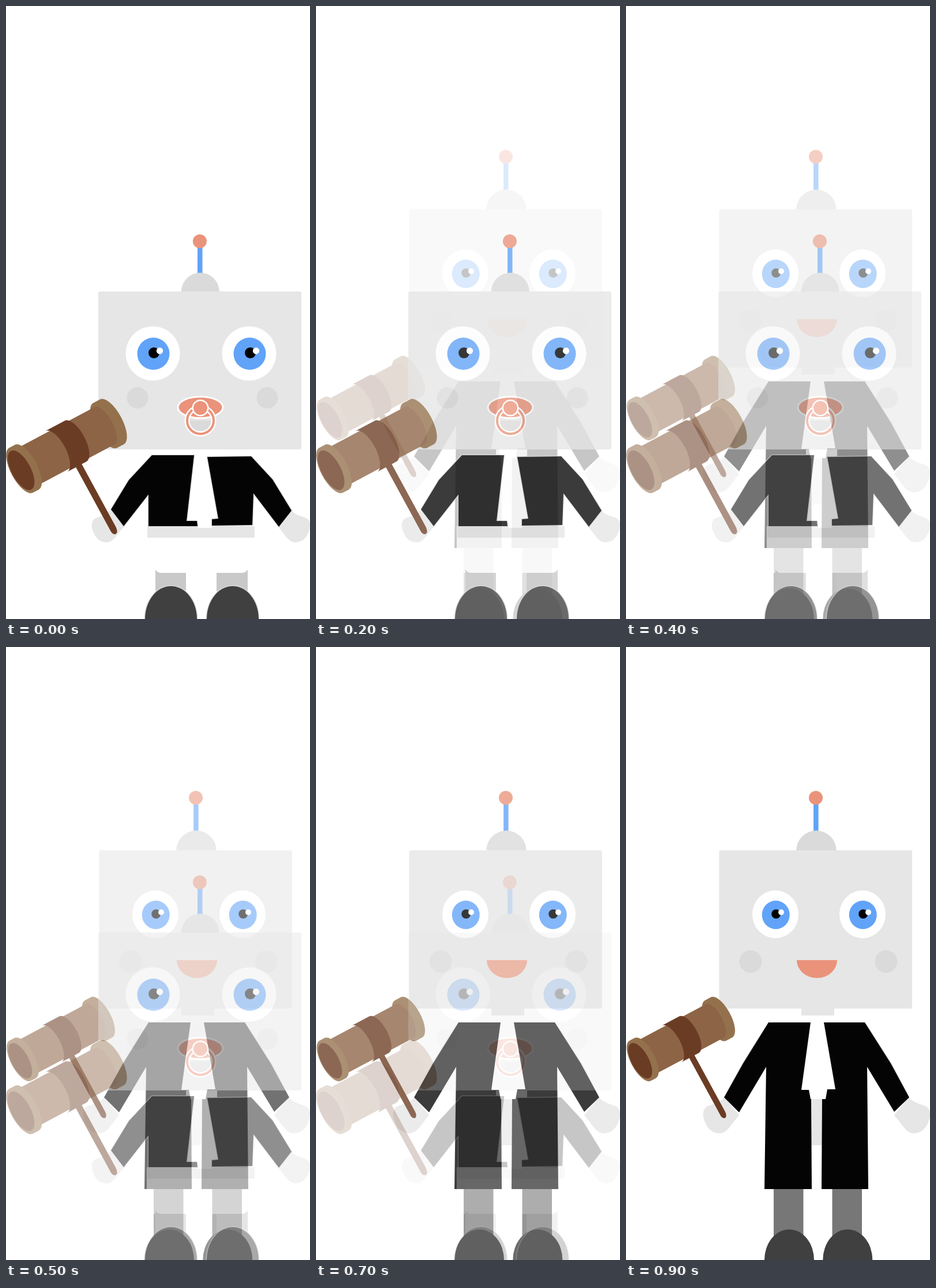
An HTML page with a canvas for the animation above (1000 ms loop, 527x1063 px).

```html
<!DOCTYPE html>
<html lang="en">
<head>
<meta charset="utf-8">
<title>Robot judge</title>
<style>
html, body { margin: 0; width: 100%; height: 100%; overflow: hidden; background: #fff; }
canvas { display: block; width: 527px; height: 1063px; }
</style>
</head>
<body>
<canvas id="stage" width="527" height="1063"></canvas>
<script>
const W = 527, H = 1063, STEP = 100, STEPS = 10;
const SKIN = '#e6e6e6', SHADE = '#dadada', BLUE = '#61a3f8', CORAL = '#ea937a',
  ROBE = '#040404', SHOE = '#404040', WOOD = '#8d6446', DARK_WOOD = '#6b3c24', RIM = '#94714d';

let g;

function oval(x, y, rx, ry, color, from = 0, to = Math.PI * 2) {
  g.beginPath();
  g.ellipse(x, y, rx, ry, 0, from, to);
  g.fillStyle = color;
  g.fill();
}

function dot(x, y, r, color) {
  oval(x, y, r, r, color);
}

function rect(x, y, w, h, color, r = 0) {
  g.beginPath();
  g.roundRect(x, y, w, h, r);
  g.fillStyle = color;
  g.fill();
}

function shape(d, color, edge) {
  const path = new Path2D(d);
  if (edge) {
    g.lineWidth = 2.5;
    g.strokeStyle = edge;
    g.stroke(path);
  }
  g.fillStyle = color;
  g.fill(path);
}

function placed(x, y, sx, sy, draw) {
  g.save();
  g.translate(x, y);
  g.scale(sx, sy);
  draw();
  g.restore();
}

function hand() {
  shape('M33-56C27-48 17-46 9-43C-1-40-2-29 2-19C7-4 17 1 28 0C38-2 43-13 56-28Z', SKIN);
}

function hands(left, right, y, scale) {
  placed(left, y, scale, scale, hand);
  placed(right, y, -scale, scale, hand);
}

function shoe(x, rx, ry) {
  oval(x, H, rx, ry, SHOE, Math.PI, Math.PI * 2);
}

function antenna(x, ballY, domeY, r) {
  rect(x - 4.2, ballY + 8, 8.5, domeY - r - ballY - 6, BLUE);
  dot(x - 0.3, ballY, 12, CORAL);
  oval(x + 0.6, domeY, r, r, SHADE, Math.PI, Math.PI * 2);
}

// A section of the gavel; a hollow one curves inward at its left end.
function tube(u0, u1, ru, rv, color, hollow = false) {
  const q = Math.PI / 2;
  g.beginPath();
  g.ellipse(u1, 0, ru, rv, 0, -q, q);
  g.ellipse(u0, 0, ru, rv, 0, q, hollow ? -q : 3 * q, hollow);
  g.closePath();
  g.fillStyle = color;
  g.fill();
}

function gavel() {
  shape('M107 708L116 703L172 806Q176 815 171 817Q166 818 162 809Z', DARK_WOOD);
  g.save();
  g.translate(24.5, 717.5);
  g.rotate(-0.49);
  tube(148, 160, 16, 39.5, RIM);
  tube(0, 147, 13, 33, WOOD);
  tube(62, 96, 15, 36, DARK_WOOD, true);
  tube(0, 10, 16, 39.5, RIM);
  oval(0, 0, 15, 34, DARK_WOOD);
  g.restore();
}

function pacifier() {
  oval(337, 696, 40.5, 20, '#fff');
  oval(337, 696, 37.5, 17, CORAL);
  oval(337, 719, 20, 20, SHADE, 0, Math.PI);
  for (const [width, color] of [[9, '#fff'], [4, CORAL]]) {
    g.beginPath();
    g.arc(337, 719, 23, 0, Math.PI * 2);
    g.lineWidth = width;
    g.strokeStyle = color;
    g.stroke();
  }
  dot(337, 697, 14.5, '#fff');
  dot(337, 697, 12, CORAL);
}

function baby() {
  rect(244, 902, 187, 81, '#fff');
  shape('M259 977Q262 983 270 983H312V1015H259Z', '#c9c9c9');
  shape('M365 983H408Q416 983 419 977V1015H365Z', '#c9c9c9');
  for (const x of [286, 393]) {
    oval(x, H, 46.5, 58.5, '#dcdcdc', Math.PI, Math.PI * 2);
    shoe(x, 45, 57);
  }

  rect(245, 902, 186, 20, SKIN);
  shape('M312 769H366V781H349L369 889L357 905H333L331 893H313L326 779H312Z', '#fff');
  hands(149, 527, 930, 1);
  shape('M253 779H326L313 893H331L332 902H247V847L204 902L182 873L213 822Z', ROBE, '#dedede');
  shape('M349 782L425 781L462 821L495 875L473 903L429 845L427 900L357 901V890L368 889Z', ROBE, '#dedede');

  antenna(336.2, 408, 495.5, 33);
  rect(160, 495, 352, 274, SKIN, 3);
  for (const x of [254.5, 421.5]) {
    dot(x, 602.5, 47, '#fff');
    dot(x + 1, 603, 28, BLUE);
    dot(x + 2, 601.5, 9.5, '#000');
    dot(x + 12, 598, 5.7, '#fff');
  }
  for (const x of [228, 453]) dot(x, 679.5, 18.5, SHADE);
  pacifier();
  placed(-1.1, 5, 1.115, 1.115, gavel);
}

function adult() {
  rect(321, 784, 19, 80, SKIN);
  rect(256, 940, 51.5, 85, '#777');
  rect(357.5, 940, 51.5, 85, '#777');
  shoe(283, 43, 53);
  shoe(384.3, 43, 53);

  hands(134, 527, 843, 1.11);
  shape('M245 651L201 722L170 781L203 724ZM415 651L461 722L492 781L459 724Z', SKIN);
  shape('M247 651H320L304 768H317L320 784H321L322 940H240L243 728L196 807L170 781L203 722Z', ROBE);
  shape('M343 651H414L459 722L491 781L465 806L418 728L420 940H339L340 784H346L349 767H363Z', ROBE);

  antenna(329.3, 261.5, 353, 34.7);
  rect(304, 626, 57, 13, SKIN);
  rect(161.5, 352.5, 334.5, 274.5, SKIN, 3);
  for (const x of [259, 410]) {
    oval(x, 463.5, 40, 41.5, '#fff');
    oval(x + 0.7, 464.5, 24, 24.7, BLUE);
    dot(x + 1.2, 463, 8, '#000');
    dot(x + 10, 460, 5, '#fff');
  }
  for (const x of [216, 451]) dot(x, 545.5, 19.5, SHADE);
  oval(331, 543, 35, 31, CORAL, 0, Math.PI);
  gavel();
}

function layer(draw) {
  const canvas = document.createElement('canvas');
  canvas.width = W;
  canvas.height = H;
  g = canvas.getContext('2d');
  draw();
  return canvas;
}

const adultLayer = layer(adult), babyLayer = layer(baby);
const stage = document.getElementById('stage').getContext('2d');
const start = performance.now();

function frame() {
  const elapsed = Math.max(0, performance.now() - start);
  const grown = Math.floor(elapsed / STEP) % STEPS / (STEPS - 1);
  stage.globalAlpha = 1;
  stage.fillStyle = '#fff';
  stage.fillRect(0, 0, W, H);
  stage.globalAlpha = grown;
  stage.drawImage(adultLayer, 0, 0);
  stage.globalAlpha = 1 - grown;
  stage.drawImage(babyLayer, 0, 0);
  requestAnimationFrame(frame);
}
frame();
</script>
</body>
</html>
```
